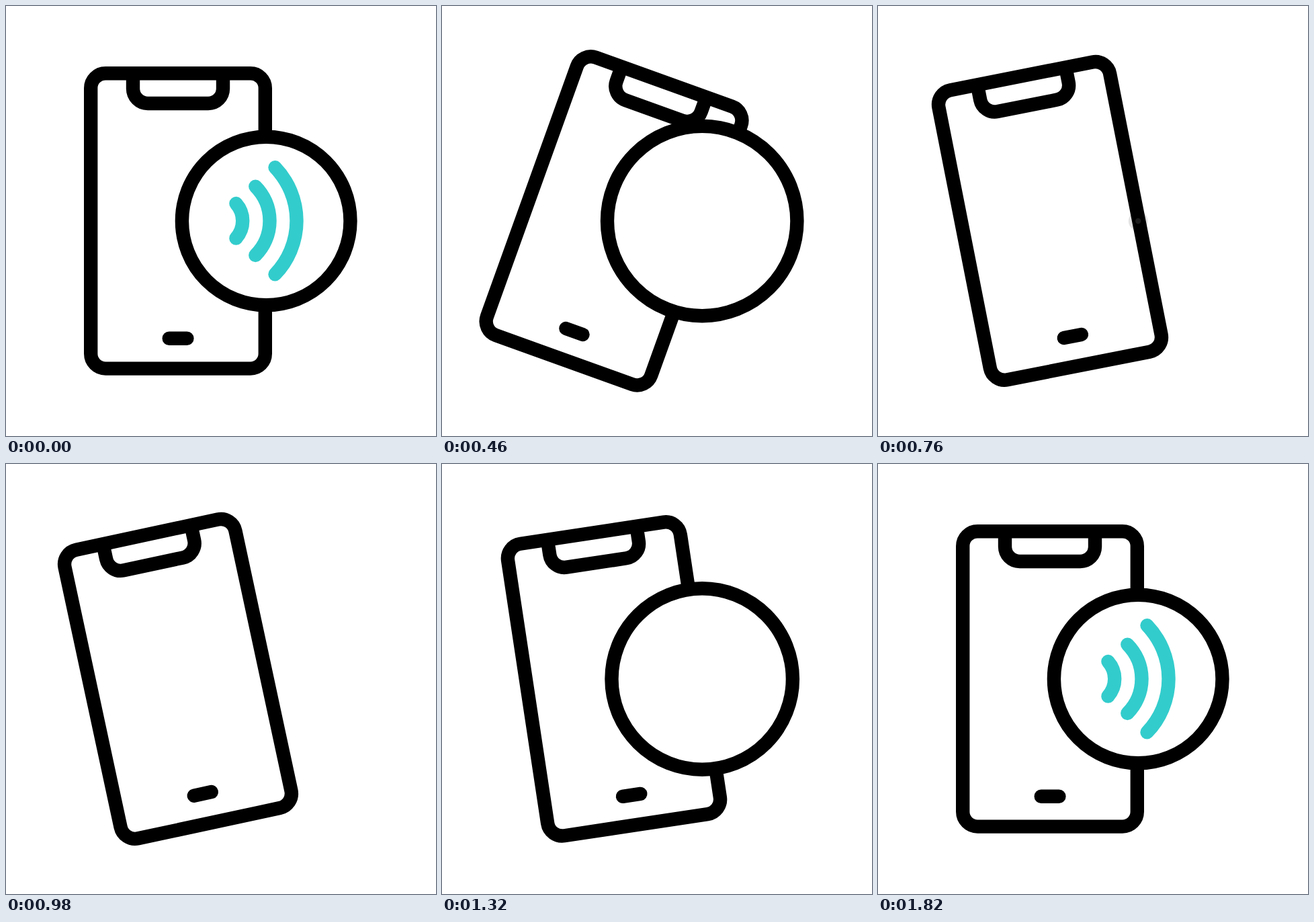
Animation, 640 px wide and 640 px high, one loop 2.2 s. Source, as an HTML page:

```html
<!DOCTYPE html>
<html lang="en">
<head>
<meta charset="utf-8">
<title>Contactless phone</title>
<style>
  html, body { margin: 0; width: 100%; height: 100%; overflow: hidden; background: #fff; }
  svg { display: block; width: 100vw; height: 100vh; }
</style>
</head>
<body>
<svg viewBox="0 0 640 640" fill="none" stroke="#000" stroke-width="20.4" stroke-linecap="round">
  <g id="phone">
    <rect x="126.2" y="100.2" width="259.6" height="439.4" rx="22"/>
    <path d="M189 101v22a22 22 0 0 0 22 22h90a22 22 0 0 0 22-22v-22"/>
    <path d="M242.7 494.8h26.7"/>
  </g>
  <circle id="disc" cx="387.2" cy="320" fill="#fff"/>
  <g id="waves" stroke="#33cccc">
    <path pathLength="2" d="M342.4 294a38.8 38.8 0 0 1 0 51.6"/>
    <path pathLength="2" d="M371.3 268.6a72.4 72.4 0 0 1 0 102.4"/>
    <path pathLength="2" d="M400.5 240.3a114.7 114.7 0 0 1 0 159"/>
  </g>
</svg>
<script>
const LOOP = 2200, ACTIVE = 1800;
const phone = document.getElementById('phone');
const disc = document.getElementById('disc');
const waves = document.querySelectorAll('#waves path');

const smooth = u => u * u * (3 - 2 * u);
const easeIn = u => u * u;
const easeOut = u => u * (2 - u);

// Eased 0 to 1 between two times
const ramp = (t, from, to, ease = smooth) =>
  ease(Math.min(1, Math.max(0, (t - from) / (to - from))));

const tilt = t =>
  20 * ramp(t, 0, 440, easeOut)
  - 40 * ramp(t, 440, 900)
  + 30.4 * ramp(t, 900, 1140)
  - 20.8 * ramp(t, 1140, 1360)
  + 10.4 * ramp(t, 1360, ACTIVE, easeIn);

// Show the middle part of a wave, 0 to 1 of its length
function trim(wave, part) {
  wave.style.visibility = part > 0 ? 'visible' : 'hidden';
  wave.setAttribute('stroke-dasharray', `${2 * part} 9`);
  wave.setAttribute('stroke-dashoffset', part - 1);
}

function draw(t) {
  phone.setAttribute('transform', `rotate(${tilt(t)} 256 320)`);

  // Disc and waves leave, then return along the same path in reverse
  const m = Math.min(t, ACTIVE - t);
  const alpha = 1 - ramp(m, 600, 800);
  disc.setAttribute('r', 125.3 * (1 + 0.2 * ramp(m, 200, 400) - 1.2 * ramp(m, 400, 800)));
  disc.setAttribute('fill-opacity', alpha);
  disc.setAttribute('stroke-opacity', alpha);
  waves.forEach((wave, i) => trim(wave, 1 - ramp(m, 200 - 100 * i, 400 - 100 * i)));
}

let start;
function tick(now) {
  start ??= now;
  draw((now - start) % LOOP);
  requestAnimationFrame(tick);
}
draw(0);
requestAnimationFrame(tick);
</script>
</body>
</html>
```
